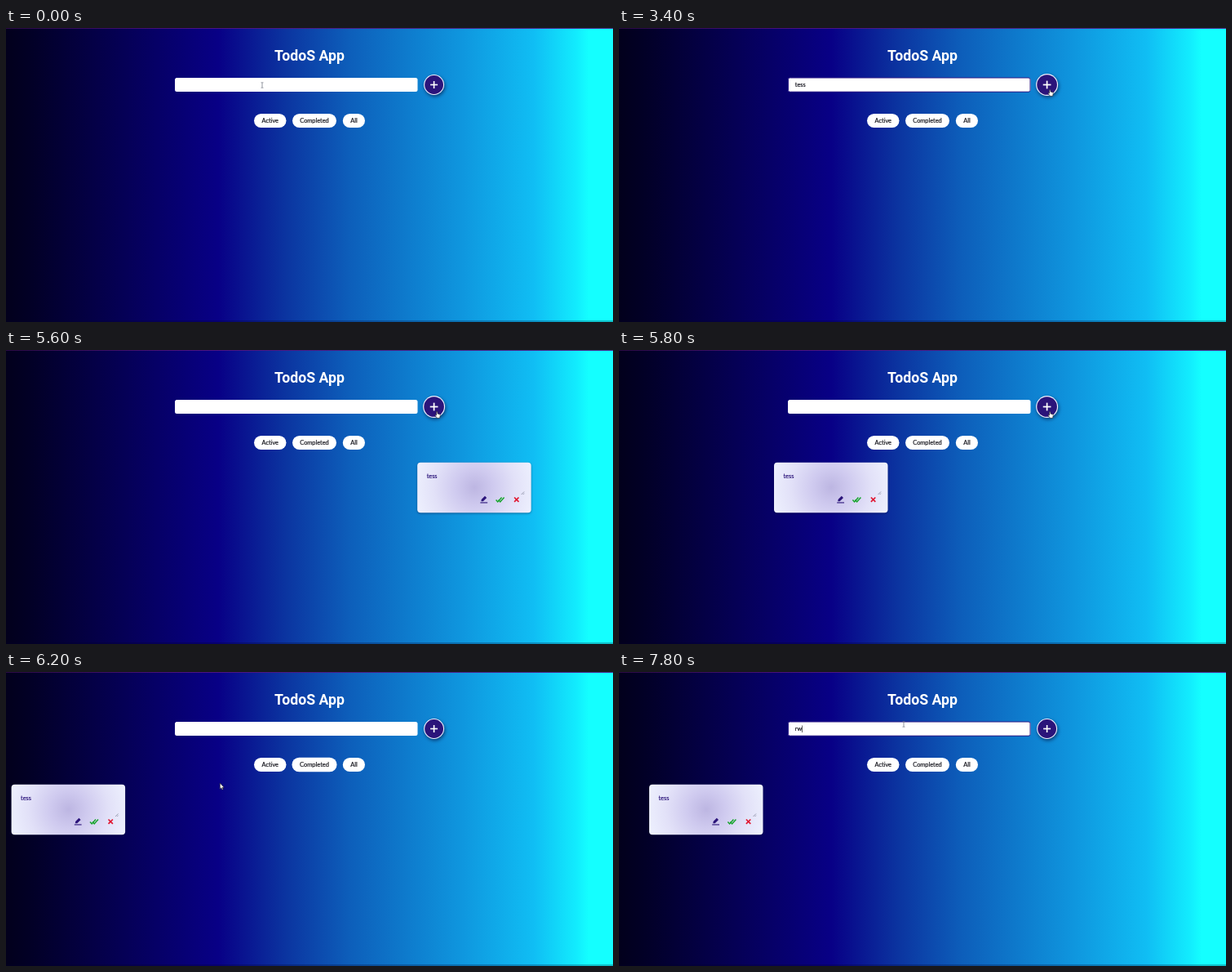
These frames come from a looping animation (744 px wide and 360 px high, 8 s). An HTML page with a canvas:

```html
<!DOCTYPE html>
<html lang="en">
<head>
<meta charset="utf-8">
<title>TodoS App</title>
<style>
html, body { margin: 0; width: 100%; height: 100%; overflow: hidden; background: #020020; }
canvas { display: block; width: 744px; height: 360px; }
</style>
</head>
<body>
<canvas id="stage" width="744" height="360"></canvas>
<script>
const W = 744, H = 360, LOOP = 8000, STEP = 100;
const NAVY = '#2b147a';
const ctx = document.getElementById('stage').getContext('2d');

const clamp = v => Math.min(1, Math.max(0, v));
const mix = (a, b, k) => a + (b - a) * k;
const smooth = k => k * k * (3 - 2 * k);
const between = (t, a, b) => t >= a && t < b;

function gradient(g, stops) {
  stops.forEach(([at, color]) => g.addColorStop(at, color));
  return g;
}

const backdrop = gradient(ctx.createLinearGradient(0, 0, W, 0), [
  [0, '#02001c'], [0.04, '#020026'], [0.35, '#080086'], [0.46, '#0b34a0'],
  [0.565, '#0d5eba'], [0.75, '#0f96de'], [0.87, '#10bef4'], [0.94, '#12ecfe'], [0.96, '#14ffff'], [1, '#14ffff']
]);
const topLine = gradient(ctx.createLinearGradient(0, 0, W, 0), [
  [0, '#2a0a44'], [0.3, '#4c127e'], [1, '#4a2a90']
]);

function box(x, y, w, h, r, fill) {
  ctx.beginPath();
  ctx.roundRect(x, y, w, h, r);
  ctx.fillStyle = fill;
  ctx.fill();
}

function line(points, color, width) {
  ctx.beginPath();
  points.forEach(([x, y], i) => i ? ctx.lineTo(x, y) : ctx.moveTo(x, y));
  ctx.strokeStyle = color;
  ctx.lineWidth = width;
  ctx.stroke();
}

function shape(points, fill, edge) {
  ctx.beginPath();
  points.forEach(([x, y]) => ctx.lineTo(x, y));
  ctx.closePath();
  ctx.fillStyle = fill;
  ctx.fill();
  if (edge) {
    ctx.strokeStyle = edge;
    ctx.lineWidth = 0.6;
    ctx.stroke();
  }
}

// Small labels get a hairline stroke for a medium weight.
function label(text, x, y, color, size = 7.35, align = 'left') {
  ctx.font = size + 'px Lato, sans-serif';
  ctx.textAlign = align;
  ctx.fillStyle = ctx.strokeStyle = color;
  ctx.lineWidth = 0.2;
  ctx.fillText(text, x, y);
  ctx.strokeText(text, x, y);
}

function shadow(color, blur, dx, dy) {
  ctx.shadowColor = color;
  ctx.shadowBlur = blur;
  ctx.shadowOffsetX = dx;
  ctx.shadowOffsetY = dy;
}
const noShadow = () => shadow('transparent', 0, 0, 0);

function page() {
  ctx.fillStyle = backdrop;
  ctx.fillRect(0, 0, W, H);
  ctx.fillStyle = topLine;
  ctx.fillRect(0, 0, W, 1);
  ctx.fillStyle = 'rgba(0,0,40,.25)';
  ctx.fillRect(0, H - 2, W, 2);
  ctx.font = 'bold 17.7px Roboto, sans-serif';
  ctx.textAlign = 'center';
  ctx.fillStyle = '#fff';
  ctx.fillText('TodoS App', 372, 40);
}

function typed(t) {
  if (t >= 7800) return 'rw';
  if (t >= 7700) return 'r';
  if (t >= 5300 || t < 1900) return '';
  return t < 2100 ? 't' : t < 3000 ? 'tes' : 'tess';
}

function field(t) {
  const focus = between(t, 1400, 5000) || t >= 7400;
  const caret = between(t, 1900, 2300) || between(t, 3900, 4300) || t >= 7700;
  const text = typed(t), x = focus ? 215.8 : 214.8;
  box(207, 61, 297.5, 17, 2.5, '#fff');
  if (focus) {
    ctx.beginPath();
    ctx.roundRect(207.5, 61, 296.5, 17.2, 2);
    ctx.strokeStyle = '#2d1a86';
    ctx.lineWidth = 1;
    ctx.stroke();
  }
  label(text, x, 72.2, '#15151f');
  if (caret) {
    ctx.fillStyle = '#222';
    ctx.fillRect(Math.round(x + ctx.measureText(text).width - 0.3), 65.5, 0.7, 8.5);
  }
}

function addButton(t) {
  const press = t === 5200 ? 1 : t === 5300 ? 0.5 : 0;
  const hover = t === 3300 || t === 5900 ? 0.5 : between(t, 3400, 5900) ? 1 : 0;
  ctx.save();
  ctx.translate(524.6, 69.5);
  ctx.scale(1 + 0.08 * hover + 0.04 * press, 1 + 0.08 * hover + 0.04 * press);
  shadow('rgba(0,0,40,.55)', 4, 1, 2);
  box(-12.5, -12.5, 25, 25, 12.5, '#eef0ff');
  noShadow();
  box(-11.4, -11.4, 22.8, 22.8, 11.4, NAVY);
  ctx.fillStyle = '#fff';
  ctx.fillRect(-4.5, -0.8, 9, 1.6);
  ctx.fillRect(-0.8, -4.5, 1.6, 9);
  ctx.restore();
}

function pill(text, x, w, scale = 1) {
  ctx.save();
  ctx.translate(x + w / 2, 113.5);
  ctx.scale(scale, scale);
  box(-w / 2, -8.6, w, 17.2, 8.6, '#fff');
  label(text, 0, 2.6, '#14141c', 7.35, 'center');
  ctx.restore();
}

function pills(t) {
  const swell = between(t, 6000, 6200) ? 1.05 : t === 6200 ? 1.02 : 1;
  pill('Active', 304, 39.5);
  pill('Completed', 351, 54, swell);
  pill('All', 412.8, 27.2);
}

// Slides in from the right, overshoots, then settles.
function cardX(t) {
  return t < 6300
    ? 5 + 185 * Math.pow((6300 - t) / 500, 2.95)
    : 37 - 32 * Math.pow(1 - clamp((t - 6300) / 1000), 2);
}

function check(x, y) {
  line([[x, y + 3], [x + 2.2, y + 5.5], [x + 7, y]], '#17a52c', 1.5);
}

function card(t) {
  if (t < 5600) return;
  ctx.save();
  ctx.translate(cardX(t), 137.7);
  const glow = gradient(ctx.createRadialGradient(70, 30.5, 0, 70, 30.5, 76), [
    [0, '#bdb6e2'], [0.3, '#cfcaef'], [0.65, '#e2e1f8'], [1, '#eef1fe']
  ]);
  shadow('rgba(0,0,40,.4)', 3, 0, 1);
  box(0, 0, 139.5, 61.5, 4, glow);
  noShadow();
  label('tess', 11.5, 18.8, NAVY);
  line([[127.5, 39.3], [131, 35.8]], '#666a80', 0.6);
  line([[129.6, 39.3], [131, 37.9]], '#666a80', 0.6);

  shape([[78.2, 47.5], [78.6, 45.2], [82.8, 41], [85, 43.2], [80.7, 47.5]], NAVY);
  ctx.fillStyle = NAVY;
  ctx.fillRect(77.2, 48.7, 8.8, 1.1);
  check(96.4, 42.7);
  check(99.4, 42.7);
  line([[118.9, 42.8], [124.3, 48.2]], '#e0122d', 1.6);
  line([[124.3, 42.8], [118.9, 48.2]], '#e0122d', 1.6);
  ctx.restore();
}

const path = [
  [0, 314, 70], [2900, 314, 70], [3400, 529, 79], [5800, 529, 79],
  [6200, 263, 138], [6500, 263, 138], [7200, 349, 64], [LOOP, 349, 64]
];

function pointer(t) {
  const i = path.findIndex(p => p[0] > t);
  const [t0, x0, y0] = path[i - 1], [t1, x1, y1] = path[i];
  const k = smooth((t - t0) / (t1 - t0));
  return [mix(x0, x1, k), mix(y0, y1, k)];
}

function ibeam() {
  const color = '#777b88';
  line([[0, -3], [0, 3]], color, 0.8);
  line([[-1.5, -3.2], [1.5, -3.2]], color, 0.7);
  line([[-1.5, 3.2], [1.5, 3.2]], color, 0.7);
}

function arrow() {
  shape([[-0.7, -2], [-0.7, 5.2], [0.9, 3.8], [2, 6.2], [3.1, 5.7], [2.1, 3.4], [4.2, 3.3]], '#fff', '#222');
}

function hand() {
  shape([[-1.4, -3.6], [-0.3, -3.6], [0, -0.9], [2.8, -0.3], [3.2, 1], [2.6, 4.3], [-0.7, 4.3],
    [-3, 1], [-2.5, 0.3], [-1.4, 1]], '#fff', '#222');
}

function cursor(t) {
  const [x, y] = pointer(t);
  const inField = x > 207 && x < 504 && y > 61 && y < 78;
  const onButton = Math.hypot(x - 524.6, y - 69.5) < 13.5;
  const onPill = y > 105 && y < 122 && ((x > 304 && x < 343) || (x > 351 && x < 405) || (x > 413 && x < 440));
  ctx.save();
  ctx.translate(x, y);
  (inField ? ibeam : onButton || onPill ? hand : arrow)();
  ctx.restore();
}

function draw(now) {
  const t = Math.floor(now % LOOP / STEP) * STEP;
  page();
  field(t);
  addButton(t);
  pills(t);
  card(t);
  cursor(t);
  requestAnimationFrame(draw);
}

requestAnimationFrame(draw);
</script>
</body>
</html>
```
